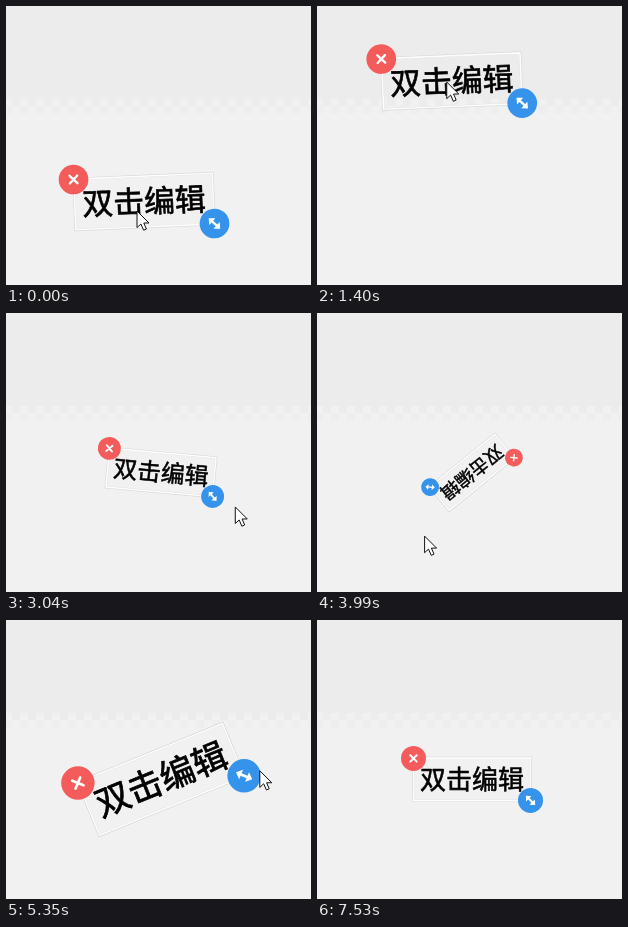
An HTML page that plays this animation: 305x279 px, repeating every 7650 ms.

```html
<!DOCTYPE html>
<html lang="zh-CN">
<head>
<meta charset="utf-8">
<title>Sticker editor</title>
<style>
  html, body { margin: 0; width: 100%; height: 100%; overflow: hidden; background: #f1f1f1; }
  svg { display: block; width: 100vw; height: 100vh; }
  text {
    font: 500 26px "Noto Sans CJK SC", "Noto Sans CJK", "Noto Sans CJK JP", sans-serif;
    text-anchor: middle; stroke: #000; stroke-width: .55;
  }
  .frame rect { fill: none; vector-effect: non-scaling-stroke; }
  .icon { stroke: #fff; stroke-width: 2; stroke-linecap: round; }
</style>
</head>
<body>
<svg viewBox="0 0 305 279" preserveAspectRatio="none">
  <defs>
    <pattern id="check" x="-2" y="92" width="16" height="16" patternUnits="userSpaceOnUse">
      <path d="M0 0h8v8H0zM8 8h8v8H8z" fill="#f1f1f1"/>
    </pattern>
  </defs>
  <rect width="305" height="108" fill="#ececec"/>
  <rect y="100" width="305" height="8" fill="#eee"/>
  <rect y="93" width="305" height="15" fill="url(#check)"/>

  <g id="sticker">
    <g class="frame">
      <rect x="-58.5" y="-21.5" width="117" height="43" stroke="#d6d6d6" stroke-width="2.4"/>
      <rect x="-58.3" y="-21.3" width="116.6" height="42.6" stroke="#fdfdfd" stroke-width="1.6"/>
    </g>
    <text y="9.5">双击编辑</text>
    <g transform="translate(-58.5 -21)">
      <circle r="12.5" fill="#f45c5c"/>
      <path class="icon" d="M-3.2-3.2 3.2 3.2M3.2-3.2-3.2 3.2"/>
    </g>
    <g transform="translate(58.5 21) rotate(45)">
      <circle r="12.5" fill="#3593eb"/>
      <path class="icon" d="M-3 0H3"/>
      <path d="M-6.6 0-2.4-3.8V3.8zM6.6 0 2.4-3.8V3.8z" fill="#fff"/>
    </g>
  </g>
  <path id="cursor" d="M0 0V16.6L3.9 13 6.6 19.2 9.4 18 6.8 12H12z" fill="#fff" stroke="#111"/>
</svg>
<script>
const LOOP = 7650, STEP = 136, SHIFT = 30;
const REACH = Math.hypot(58.5, 21);                    // centre to resize button
const TILT = Math.atan2(21, 58.5) * 180 / Math.PI;

// key points: time, then values
const place = [[0, 138, 195.5], [410, 140, 221], [1350, 134.5, 74], [1960, 155, 159.4]];
const grab = [[0, -7, 9.5], [410, -5, 1]];             // pointer from centre while dragging
const turn = [[2880, -2.4], [3900, 142], [5450, -24.9], [7050, 0]];
const size = [[2760, 1.188], [3280, .65], [3850, .65], [4700, 1.77],
  [5075, 1.77], [5670, .7], [6060, .7], [6710, 1.65], [7110, 1]];
// pointer beyond the resize button: distance, degrees
const slack = [[2630, 0, -5], [3020, 25, 0], [3970, 35, -34],
  [5330, 16, -2.5], [6150, 2, 2.5], [7110, 18, -6]];

const clamp = u => Math.min(1, Math.max(0, u));
const ramp = (t, a, b) => clamp((t - a) / (b - a));
const smooth = u => u * u * (3 - 2 * u);
const mix = (a, b, u) => a + (b - a) * u;

function at(keys, t) {
  let i = 1;
  while (i < keys.length - 1 && keys[i][0] <= t) i++;
  const [a, ...from] = keys[i - 1], [b, ...to] = keys[i];
  const u = smooth(ramp(t, a, b));
  return from.map((v, k) => mix(v, to[k], u));
}

function pointer(t, x, y, scale, angle) {
  const [dx, dy] = at(grab, t);
  const [gap, lead] = at(slack, t);
  const r = REACH * scale + gap;
  const a = (angle + TILT + lead) * Math.PI / 180;
  const grip = smooth(ramp(t, 1960, 2500));
  const leave = ramp(t, 7110, 7510) ** 2;
  return [
    x + mix(dx, r * Math.cos(a), grip) + 16 * leave,
    y + mix(dy, r * Math.sin(a), grip) + 122 * leave
  ];
}

const sticker = document.getElementById('sticker');
const cursor = document.getElementById('cursor');

function draw(ms) {
  const t = Math.max(0, SHIFT + STEP * Math.floor((ms % LOOP - SHIFT) / STEP));
  const [x, y] = at(place, t);
  const [scale] = at(size, t);
  const [angle] = at(turn, t);
  const [px, py] = pointer(t, x, y, scale, angle);
  sticker.setAttribute('transform', `translate(${x} ${y}) rotate(${angle}) scale(${scale})`);
  cursor.setAttribute('transform', `translate(${px} ${py})`);
}

const start = performance.now();
function loop() {
  draw(performance.now() - start);
  requestAnimationFrame(loop);
}
loop();
</script>
</body>
</html>
```
